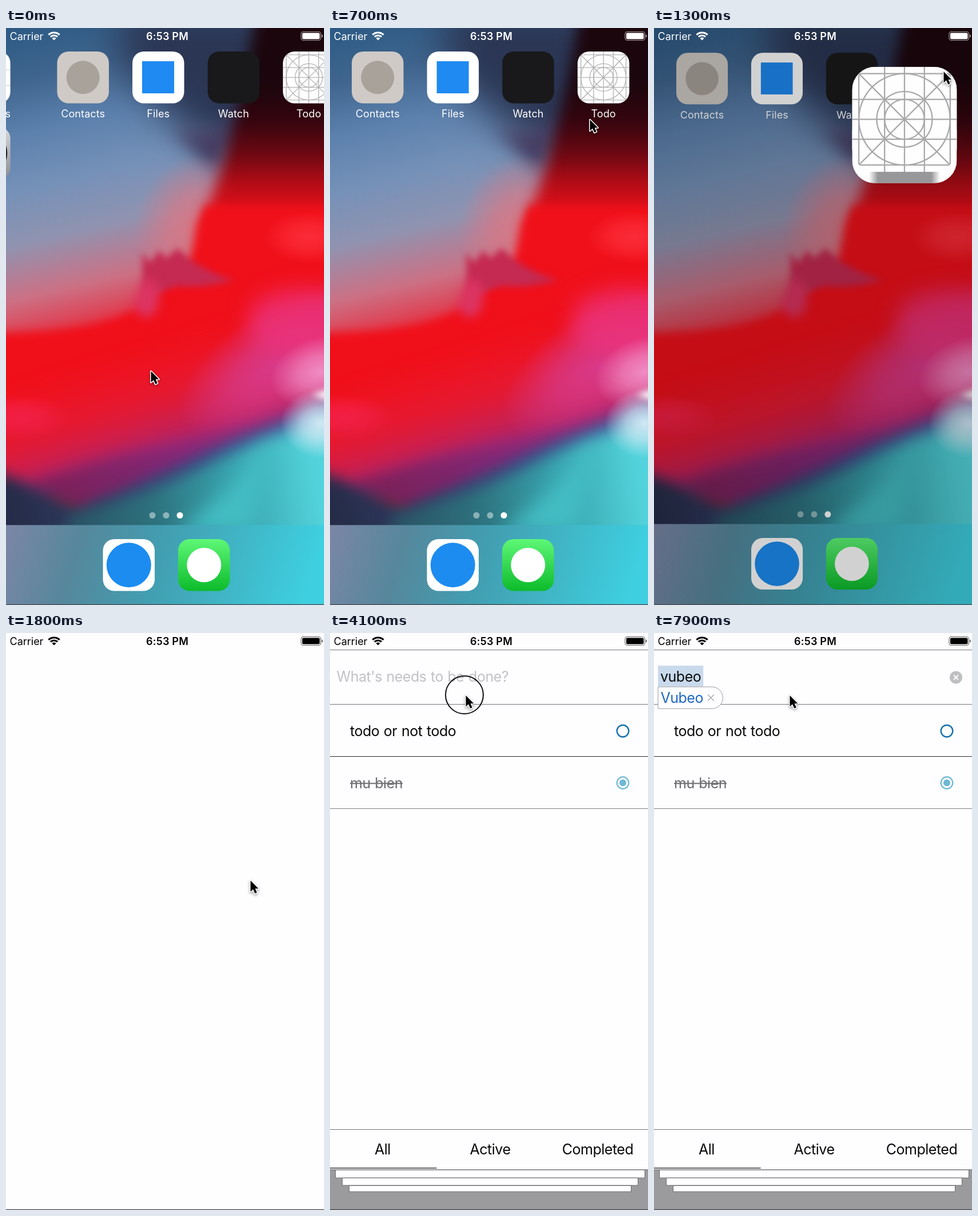
Recreate the animation shown at these times as an HTML page with a canvas. Size 556 by 1007 pixels, loop 8 s.

```html
<!DOCTYPE html>
<html lang="en">
<head>
<meta charset="utf-8">
<title>Todo app launch</title>
<style>
html, body { margin: 0; width: 100%; height: 100%; overflow: hidden; background: #fefdff; }
canvas { display: block; }
</style>
</head>
<body>
<canvas id="stage" width="556" height="1007"></canvas>
<script>
const W = 556, H = 1007, LOOP = 8000, TILE = 90.5;
const FONT = 'Inter, "Open Sans", sans-serif';
const WORD = 'vubeo', SUGGESTION = 'Vubeo';
const KEYS = [5400, 5700, 5900, 6150, 6350], SUGGEST_AT = 6500;
const ctx = document.getElementById('stage').getContext('2d');

const clamp = v => Math.max(0, Math.min(1, v));
const lerp = (a, b, p) => a + (b - a) * p;

// ---- drawing helpers ----
function setFont(size, weight, track, space) {
  ctx.font = `${weight} ${size}px ${FONT}`;
  ctx.letterSpacing = track + 'px';
  ctx.wordSpacing = space + 'px';
}
function text(str, x, y, { size = 18, weight = 400, color = '#000', align = 'left', track = 0, space = 0 } = {}) {
  setFont(size, weight, track, space);
  ctx.textAlign = align;
  ctx.fillStyle = color;
  ctx.fillText(str, x, y);
  return ctx.measureText(str).width;
}
const BODY = { size: 25, track: -0.5, space: 1.1 };
const body = (str, x, y, color = '#0a0a0a', align = 'left') => text(str, x, y, { ...BODY, color, align });
function bodyWidth(str) {
  setFont(BODY.size, 400, BODY.track, BODY.space);
  return ctx.measureText(str).width;
}

function rect(x, y, w, h, color) {
  ctx.fillStyle = color;
  ctx.fillRect(x, y, w, h);
}
function round(x, y, w, h, r, color) {
  ctx.beginPath();
  ctx.roundRect(x, y, w, h, r);
  ctx.fillStyle = color;
  ctx.fill();
}
function disc(x, y, r, color) {
  ctx.beginPath();
  ctx.arc(x, y, r, 0, 7);
  ctx.fillStyle = color;
  ctx.fill();
}
function ring(x, y, r, width, color) {
  ctx.beginPath();
  ctx.arc(x, y, r, 0, 7);
  ctx.lineWidth = width;
  ctx.strokeStyle = color;
  ctx.stroke();
}
function cross(x, y, r, width, color) {
  ctx.beginPath();
  ctx.moveTo(x - r, y - r); ctx.lineTo(x + r, y + r);
  ctx.moveTo(x + r, y - r); ctx.lineTo(x - r, y + r);
  ctx.lineWidth = width;
  ctx.strokeStyle = color;
  ctx.stroke();
}
function gradient(c, x0, y0, x1, y1, ...stops) {
  const g = c.createLinearGradient(x0, y0, x1, y1);
  stops.forEach((s, i) => g.addColorStop(i / (stops.length - 1), s));
  return g;
}

// ---- wallpaper, painted once ----
const wallpaper = (() => {
  const canvas = document.createElement('canvas');
  canvas.width = W;
  canvas.height = H;
  const c = canvas.getContext('2d');
  const blob = (path, fill, blur) => {
    c.filter = `blur(${blur}px)`;
    c.fillStyle = fill;
    c.fill(new Path2D(path));
    c.filter = 'none';
  };
  const glow = (x, y, rx, ry, angle, color) => {
    c.save();
    c.translate(x, y);
    c.rotate(angle);
    c.scale(rx, ry);
    const g = c.createRadialGradient(0, 0, 0, 0, 0, 1);
    g.addColorStop(0, color);
    g.addColorStop(0.45, color + 'b0');
    g.addColorStop(1, color + '00');
    c.fillStyle = g;
    c.fillRect(-1, -1, 2, 2);
    c.restore();
  };

  // blue haze fading to pink, dark corner
  c.fillStyle = gradient(c, 0, 0, 130, 545, '#2c5a84', '#3f658e', '#5c81ad', '#7591b8', '#9093b0', '#cc7084', '#ea2436');
  c.fillRect(0, 0, W, H);
  blob('M200 -40H600V190L400 220Q290 180 200 60Z', '#2b3654', 34);
  blob('M290 180Q370 190 410 150L365 260Q340 215 290 180', '#463d62', 15);
  glow(335, 350, 110, 130, 0.2, '#d87886');
  blob('M440 -40H620V360H335Q400 200 440 -40',
    gradient(c, 0, 100, 0, 340, '#1c060d', '#33050f', '#6c0812', '#c00d17', '#ee101a'), 12);

  // red body
  blob('M348 310Q332 350 322 400L240 480Q170 535 -40 532V900H600V310Z', '#f0101a', 8);
  glow(530, 365, 80, 45, 0, '#fb2c38');
  blob('M238 392L252 410L268 388L280 402L300 384L322 404Q360 430 400 440Q340 455 300 450L240 470Z', '#c42a52', 6);
  blob('M240 440Q275 430 265 490Q240 525 222 480Z', '#dc3462', 9);
  glow(25, 680, 90, 40, 0, '#fb2048');

  // magenta side
  blob('M-40 860L600 660V300L-40 640Z', gradient(c, 255, 550, 312, 730, '#e8204000', '#dc204490', '#a82672'), 12);
  glow(470, 590, 190, 95, -0.55, '#d83a8a');
  blob('M600 465Q510 440 440 475Q400 520 450 560L600 610Z', '#ec3580c0', 18);
  glow(550, 600, 90, 60, -0.3, '#f08cc4');

  // purple and navy folds
  blob('M40 795Q180 748 300 728T600 640V720L160 860Z', gradient(c, 60, 780, 540, 660, '#7a2056', '#80297a', '#66489a'), 14);
  blob('M-40 765L60 805L130 835Q220 800 330 750T600 655V900H-40Z',
    gradient(c, 0, 800, 540, 670, '#252c48', '#34406c', '#3b4c86', '#4a66a4'), 12);

  // teal floor
  blob('M110 850Q260 810 360 758T600 675V1040H90Z',
    gradient(c, 110, 830, 540, 760, '#2a5465', '#2d727e', '#38a4ae', '#53d4dc'), 13);
  blob('M300 880Q400 800 470 720L430 880Z', '#43bcc2', 16);
  glow(550, 690, 70, 60, 0, '#d0e8f4');
  blob('M535 640L580 625V655Z', '#fff', 6);
  return canvas;
})();

// ---- home screen ----
function gridIcon(x, y, s) {
  const line = Math.max(1, s * 0.0125);
  ctx.save();
  ctx.beginPath();
  ctx.roundRect(x, y, s, s, s * 0.225);
  ctx.fillStyle = '#fefefe';
  ctx.fill();
  ctx.clip();
  ctx.beginPath();
  for (const f of [0.064, 0.31, 0.5, 0.69, 0.936]) {
    ctx.moveTo(x + f * s, y); ctx.lineTo(x + f * s, y + s);
    ctx.moveTo(x, y + f * s); ctx.lineTo(x + s, y + f * s);
  }
  ctx.lineWidth = line;
  ctx.strokeStyle = '#a8a8aa';
  ctx.stroke();
  cross(x + s / 2, y + s / 2, s / 2, line, '#a8a8aa');
  for (const r of [0.19, 0.265, 0.436]) ring(x + s / 2, y + s / 2, r * s, line, '#a8a8aa');
  ctx.restore();
}

const label = (str, x) => text(str, x + TILE / 2, 156, { color: '#fff', align: 'center', track: 0.1 });
const tile = (x, y, fill) => round(x, y, TILE, TILE, 20, fill);
const mark = (x, y, r, color) => disc(x + TILE / 2, y + TILE / 2, r, color);

function home(t, opening) {
  ctx.drawImage(wallpaper, 0, 0);
  const scale = 1 - 0.025 * opening;
  ctx.save();
  ctx.translate(W / 2, H / 2);
  ctx.scale(scale, scale);
  ctx.translate(-W / 2, -H / 2);

  const slide = 52 * Math.exp(-t / 130);
  const column = i => 37.8 + i * 131.6 + slide;
  const previous = -134.5 + slide;
  tile(previous, 41, '#fff');
  label('Reminders', previous);
  rect(previous, 73, TILE, 1, '#ccc');
  rect(previous, 100, TILE, 1, '#ccc');
  tile(previous, 173, gradient(ctx, 0, 173, 0, 263, '#d8d8dc', '#8c8c92'));
  mark(previous, 173, 40, '#2a2a2c');

  ['#cfcac6', '#fff', '#19191b'].forEach((fill, i) => tile(column(i), 41, fill));
  mark(column(0), 41, 29, '#a8a29b');
  rect(column(1) + 17, 58, 56, 56, '#1f8af2');
  ['Contacts', 'Files', 'Watch'].forEach((name, i) => label(name, column(i)));
  if (!opening) {
    gridIcon(column(3), 41, TILE);
    label('Todo', column(3));
  }

  for (const i of [0, 1, 2]) disc(256 + 24 * i, 850.5, 5.5, i < 2 ? 'rgba(255,255,255,.45)' : '#fff');
  rect(-20, 867.5, W + 40, 180, gradient(ctx, 0, 850, 520, 1000, '#7d86a6', '#56879c', '#429db0', '#40b6c6', '#3ecfe0'));
  tile(169.5, 892, '#fff');
  mark(169.5, 892, 39, '#1c8cf0');
  tile(301, 892, gradient(ctx, 0, 892, 0, 983, '#5ef777', '#0cbb2b'));
  mark(301, 892, 30, '#fff');
  ctx.restore();
  if (opening) rect(0, 0, W, H, `rgba(0,0,0,${Math.min(0.5, opening * 0.9)})`);
}

function launchWindow(p) {
  const w = lerp(TILE, W, p), h = lerp(TILE, H, p ** 1.3);
  const x = lerp(477.7, W / 2, p) - w / 2, y = lerp(86.2, H / 2, p) - h / 2;
  const iconAlpha = clamp((0.75 - p) / 0.4);
  const gray = Array(7).fill('#98989a');
  ctx.save();
  ctx.beginPath();
  ctx.roundRect(x, y, w, h, w * 0.225 * (1 - p * p));
  ctx.clip();
  rect(x, y, w, h, '#fefdff');
  ctx.globalAlpha = iconAlpha;
  rect(x, y + w, w, h, gradient(ctx, x + w * 0.16, 0, x + w * 0.84, 0, '#fff', ...gray, '#fff'));
  round(x, y + w * 0.6, w, w * 0.4, [0, 0, w * 0.225, w * 0.225], '#fefefe');
  gridIcon(x, y, w);
  ctx.restore();
}

// ---- status bar ----
function statusBar(color) {
  text('Carrier', 6.5, 20.5, { color });
  text('6:53 PM', 282, 20.5, { color, weight: 600, align: 'center', track: 0.2 });
  ctx.strokeStyle = color;
  const fan = (r, width) => {
    ctx.beginPath();
    ctx.arc(84, 21.5, r, -Math.PI * 0.75, -Math.PI * 0.25);
    ctx.lineWidth = width;
    ctx.stroke();
  };
  fan(2.5, 5);
  fan(8.6, 3);
  fan(13.6, 3);
  ctx.beginPath();
  ctx.roundRect(516, 6.5, 34.5, 15, 4);
  ctx.lineWidth = 1.2;
  ctx.globalAlpha = 0.6;
  ctx.stroke();
  round(552, 11.5, 2, 5, [0, 2, 2, 0], color);
  ctx.globalAlpha = 1;
  round(518, 8.5, 30.5, 11, 2, color);
}

// ---- todo app ----
function inputRow(t) {
  const pressed = KEYS.filter(k => t >= k);
  const typed = WORD.slice(0, pressed.length);
  const suggesting = t >= SUGGEST_AT;
  let width = 0;
  if (suggesting) rect(7, 57, bodyWidth(WORD) + 8, 36.5, '#c9daec');
  if (typed) {
    width = body(typed, 11, 84.5);
    disc(528, 77.5, 11, '#bfbfc2');
    cross(528, 77.5, 4, 2, '#fff');
  } else {
    body("What's needs to be done?", 11.5, 84.5, '#c2c1c6');
  }
  const idle = t - Math.max(4400, ...pressed);
  if (idle >= 0 && idle % 1000 < 550) rect(10.5 + width, 59, 2.6, 33, '#3c66dc');

  if (suggesting) {
    const w = bodyWidth(SUGGESTION);
    round(7, 94, w + 39, 38, [0, 19, 19, 0], '#fefdff');
    ctx.lineWidth = 1;
    ctx.strokeStyle = '#9c9c9f';
    ctx.stroke();
    body(SUGGESTION, 11.5, 121.5, '#1d68c6');
    cross(w + 25, 113, 5.5, 1.4, '#a9a9ac');
  }
}

function todoApp(t) {
  rect(0, 29, W, 1, '#77777a');
  rect(0, 124, W, 1, '#77777a');
  rect(0, 215, W, 1, '#2b2b2d');
  rect(0, 306, W, 1, '#808083');
  body('todo or not todo', 35, 179.5);
  ring(512, 171, 10.3, 2.4, '#1673ad');
  const w = body('mu bien', 35, 270.5, '#6c6c6e');
  rect(35, 261.5, w, 2, '#6c6c6e');
  ring(512, 261.5, 10.3, 2.2, '#6fb8d4');
  disc(512, 261.5, 6, '#6fb8d4');

  rect(0, 866, W, 1, '#707073');
  ['All', 'Active', 'Completed'].forEach((s, i) => body(s, 92 + 188 * i, 910, '#0a0a0a', 'center'));
  rect(0, 933, 186.5, 1.6, '#444446');
  rect(0, 937, W, 70, '#9b9b9d');
  rect(0, 936.3, W, 1, '#5c5c5e');
  [[9, 937, 14], [21, 951, 13], [33, 964.5, 10.5]].forEach(([x, y, h]) => {
    rect(x, y, 560 - 2 * x, h, '#fefdff');
    ctx.lineWidth = 1;
    ctx.strokeStyle = '#6c6c6e';
    ctx.strokeRect(x + 0.5, y, 559 - 2 * x, h);
  });
  inputRow(t);
}

// ---- pointer ----
const POINTER = [[0, 252, 597], [650, 453, 158], [750, 453, 158], [1050, 500, 78], [1300, 505, 74],
  [1800, 426, 430], [2000, 426, 430], [2300, 246, 288], [2900, 246, 288], [3600, 236, 107], [LOOP, 236, 107]];
const ARROW = new Path2D('M1.5 2V21.5L6 17.3L9.3 24.6L12.8 23L9.6 16H15.3Z');

function pointer(t) {
  const i = POINTER.findIndex(k => t < k[0]);
  const [t0, x0, y0] = POINTER[i - 1], [t1, x1, y1] = POINTER[i];
  const u = (t - t0) / (t1 - t0), p = u * u * (3 - 2 * u);
  const x = lerp(x0, x1, p), y = lerp(y0, y1, p);
  if (t >= 3800 && t < 4300) ring(235, 108, 33 + 4 * clamp((3900 - t) / 100), 2, '#111');
  ctx.save();
  ctx.translate(x, y);
  ctx.lineJoin = 'round';
  ctx.lineWidth = 3;
  ctx.strokeStyle = '#fff';
  ctx.shadowColor = 'rgba(0,0,0,.4)';
  ctx.shadowBlur = 4;
  ctx.shadowOffsetY = 2;
  ctx.stroke(ARROW);
  ctx.shadowColor = 'transparent';
  ctx.fillStyle = '#000';
  ctx.fill(ARROW);
  ctx.restore();
}

// Critically damped spring that settles before 1.8 s.
function openProgress(t) {
  const s = Math.max(0, t - 1233) * 0.012;
  return t >= 1790 ? 1 : Math.min(1, (1 - (1 + s) * Math.exp(-s)) / 0.99);
}

function draw(t) {
  const p = openProgress(t);
  if (p < 1) home(t, p);
  else rect(0, 0, W, H, '#fefdff');
  if (p > 0 && p < 1) launchWindow(p);
  statusBar(p > 0.7 ? '#000' : '#fff');
  if (t >= 2700) todoApp(t);
  rect(0, 1005.7, W, 1.3, '#4a4a50');
  pointer(t);
}

const start = performance.now();
(function frame() {
  draw((performance.now() - start) % LOOP);
  requestAnimationFrame(frame);
})();
</script>
</body>
</html>
```
